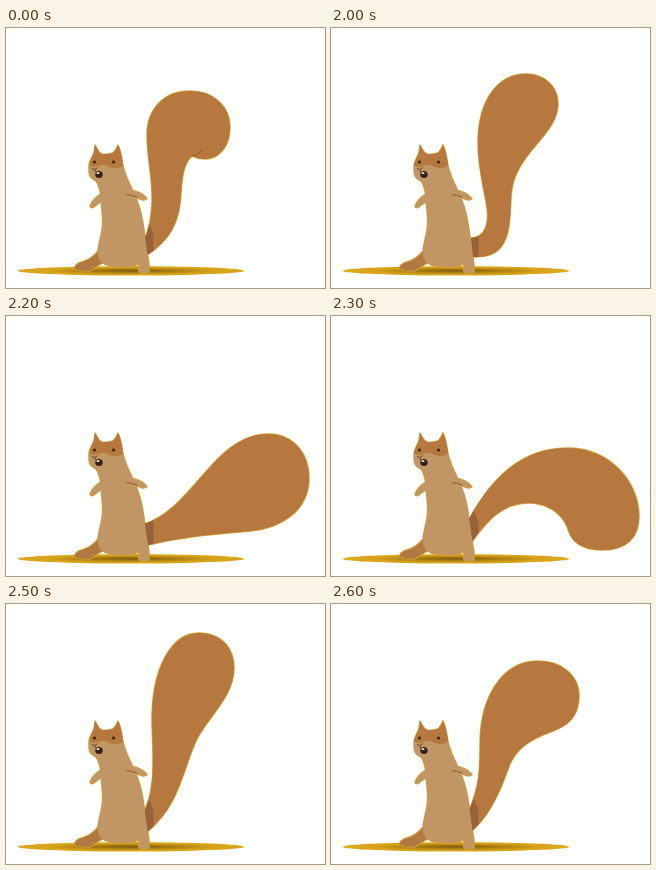
Recreate the animation shown at these times as an HTML page. Size 319 px wide and 260 px high, loop 2700 ms.

```html
<!DOCTYPE html>
<html lang="en">
<head>
<meta charset="utf-8">
<title>Squirrel</title>
<style>
  html, body { margin: 0; width: 100%; height: 100%; overflow: hidden; background: #fff; }
  svg { display: block; width: 100vw; height: 100vh; }
  .fur { fill: #b6783f; }
  .belly { fill: #c29565; }
  .rim { stroke: #d5a32f; stroke-width: 1.5; stroke-linejoin: round; paint-order: stroke; }
  .line { fill: none; stroke: #8d5a33; stroke-linecap: round; }
  .tail { animation: swish 2.7s step-end infinite; }
  .fold { animation: fold 2.7s step-end infinite; }

  /* The tail rests for 2 s, then whips round in 100 ms poses. */
  @keyframes swish {
    0%, 100% { d: path("M138 212C142 204 145 195 146 175C147 150 141 131 141 107C141 81 158 63 184 63C208 63 224 79 224 99C224 117 214 131 199 131C194 131 190 130 186 128C178 135 176 148 175 165C174 192 165 212 141 227Z"); }
    74.07% { d: path("M140 210C155 209 158 195 156 180C153 160 147 140 147 115C147 75 165 46 195 46C214 46 227 59 227 76C227 92 215 105 205 117C188 137 181 150 180 170C179 190 179 208 170 219C163 228 152 229 142 229Z"); }
    77.77% { d: path("M140 215C165 217 182 216 189 207C197 195 196 172 184 161C174 151 148 146 148 118C148 102 163 88 183 88C219 88 247 124 247 162C247 203 217 232 180 232C165 232 155 231 141 230Z"); }
    81.48% { d: path("M138 208C165 200 185 172 205 150C222 131 240 118 262 118C287 118 303 137 303 162C303 195 275 212 245 215C210 218 180 220 142 229Z"); }
    85.18% { d: path("M136 207C151 179 180 132 236 132C280 132 308 167 308 200C308 222 295 234 272 234C248 234 240 224 237 213C231 196 215 187 198 187C171 187 156 205 140 227Z"); }
    88.88% { d: path("M132 172C136 110 170 63 222 63C252 63 274 80 274 101C274 122 258 134 236 135C205 137 188 138 174 149C156 161 148 188 144 222L139 235L134 190Z"); }
    92.59% { d: path("M138 208C150 185 147 150 146 120C145 65 165 29 193 29C216 29 228 45 228 64C228 92 203 112 191 135C177 163 175 200 141 228Z"); }
    96.29% { d: path("M138 207C149 180 149 165 149 140C149 95 170 57 207 57C232 57 248 73 248 91C248 112 238 121 222 127C200 135 187 143 179 160C170 185 160 210 141 227Z"); }
  }
  @keyframes fold {
    0%, 100% { visibility: visible; }
    74.07% { visibility: hidden; }
  }
</style>
</head>
<body>
<svg viewBox="0 0 319 260">
  <defs>
    <radialGradient id="ground">
      <stop offset="0" stop-color="#80590f"/>
      <stop offset=".35" stop-color="#a87c12"/>
      <stop offset=".75" stop-color="#d6a31a"/>
      <stop offset="1" stop-color="#dca91c"/>
    </radialGradient>
    <clipPath id="inTail"><path class="tail"/></clipPath>
    <path id="body" d="M83 138C83 131 89 129 89 117C91 121 93 125 96 126Q101 127 107 125C109 123 111 120 112 117C115 123 116 130 117 138C119 147 123 155 127 163C132 173 135 183 137 195C139 208 141 224 143 236L143 243Q143 245 139 245H135Q132 244 133 240V236Q126 239 115 239C104 239 98 237 94 233C89 225 94 214 96 202C98 190 95 180 95 168C94 161 93 157 90 153C86 151 83 149 83 143Z"/>
    <clipPath id="inBody"><use href="#body"/></clipPath>
  </defs>

  <ellipse cx="125" cy="242.8" rx="113.5" ry="4.7" fill="url(#ground)"/>

  <use href="#body" class="belly rim"/>
  <path class="tail fur rim"/>
  <path clip-path="url(#inTail)" fill="#97623a" d="M131 168C137 183 143 194 147.5 206V235H131Z"/>
  <path class="line fold" d="M186 128Q192 127 196 122"/>

  <path class="rim" fill="#b27943" d="M92 223C86 231 80 233 74 234.5Q69 237 68.5 240Q69 243 83 243Q88 240 96 235Z"/>
  <use href="#body" class="belly"/>
  <path clip-path="url(#inBody)" class="fur" d="M80 110H120V136Q112 142 104 139Q98 135 92 138Q87 140 80 136Z"/>

  <path class="belly rim" d="M95 166C90 169 86 173 84 178Q85 181 88 179Q92 175 97 173Z"/>
  <path class="belly rim" d="M124 162C131 163 138 166 141 171Q138 173 134 171L125 168Z"/>
  <path class="belly" d="M94 165L99 166V175L95 174ZM117 159L127 162L128 169L119 167Z"/>
  <path class="line" d="M121 166.5Q126 167 131 169"/>

  <g fill="#35211a">
    <circle cx="88.5" cy="134" r="1.5"/>
    <circle cx="107.5" cy="134" r="1.5"/>
    <ellipse cx="93" cy="146.5" rx="3.7" ry="3.6"/>
  </g>
  <path fill="none" stroke="#5b3a25" d="M86 140L88.5 142L91.5 139.5M88.5 142Q89 144 91 144"/>
  <ellipse cx="92" cy="145" rx="1.6" ry="1" fill="#e6dfd8"/>
</svg>
</body>
</html>
```
